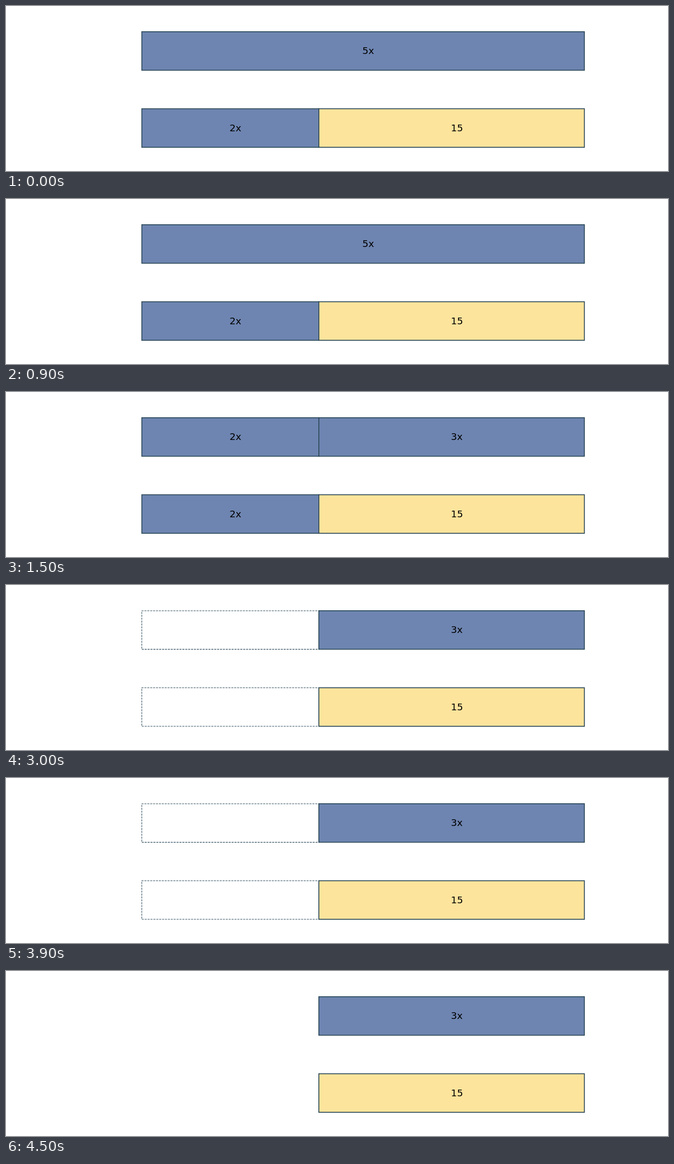
An HTML page for the animation above (6 s loop, 1280x320 px).

```html
<!DOCTYPE html>
<html lang="en">
<head>
<meta charset="utf-8">
<title>Bar model</title>
<style>
  html, body { margin: 0; width: 100%; height: 100%; overflow: hidden; background: #fff; }
  svg { display: block; width: 100%; height: 100%; }
  rect { stroke: #2a4858; stroke-width: 1.7; }
  .dashed { fill: none; stroke-width: 1.05; stroke-dasharray: 3.9 1.7; }
  text { font: 18.5px "DejaVu Sans", sans-serif; }
</style>
</head>
<body>
<svg id="stage" viewBox="0 0 1280 320"></svg>
<script>
const stage = document.getElementById("stage");
const BLUE = "#6e85b1", YELLOW = "#fde49c";
const LEFT = 262.6, UNIT = 171.15, HEIGHT = 74.7;
const TOP_ROW = 49.9, BOTTOM_ROW = 199.3;
const STEP_MS = 1500;

// Bars are placed in units of x; each label starts at its bar's centre.
function bar(row, start, units, fill, label) {
  const x = LEFT + start * UNIT, width = units * UNIT;
  return `<rect x="${x}" y="${row}" width="${width}" height="${HEIGHT}" fill="${fill}"/>` +
    `<text x="${x + width / 2 - 1.4}" y="${row + 43.3}">${label}</text>`;
}

function removed(row) {
  const right = LEFT + 2 * UNIT, bottom = row + HEIGHT;
  return `<path class="dashed" stroke="#2a4858" d="M${LEFT} ${bottom}H${right}V${row}H${LEFT}Z"/>`;
}

const whole = bar(TOP_ROW, 0, 5, BLUE, "5x");
const topTwo = bar(TOP_ROW, 0, 2, BLUE, "2x");
const topThree = bar(TOP_ROW, 2, 3, BLUE, "3x");
const bottomTwo = bar(BOTTOM_ROW, 0, 2, BLUE, "2x");
const fifteen = bar(BOTTOM_ROW, 2, 3, YELLOW, "15");

const steps = [
  whole + bottomTwo + fifteen,
  topTwo + topThree + bottomTwo + fifteen,
  removed(TOP_ROW) + removed(BOTTOM_ROW) + topThree + fifteen,
  topThree + fifteen
];

let shown = -1;
function draw(ms) {
  const step = Math.floor(ms / STEP_MS) % steps.length;
  if (step !== shown) stage.innerHTML = steps[shown = step];
}

const begin = performance.now();
function tick() {
  draw(performance.now() - begin);
  requestAnimationFrame(tick);
}
tick();
</script>
</body>
</html>
```
